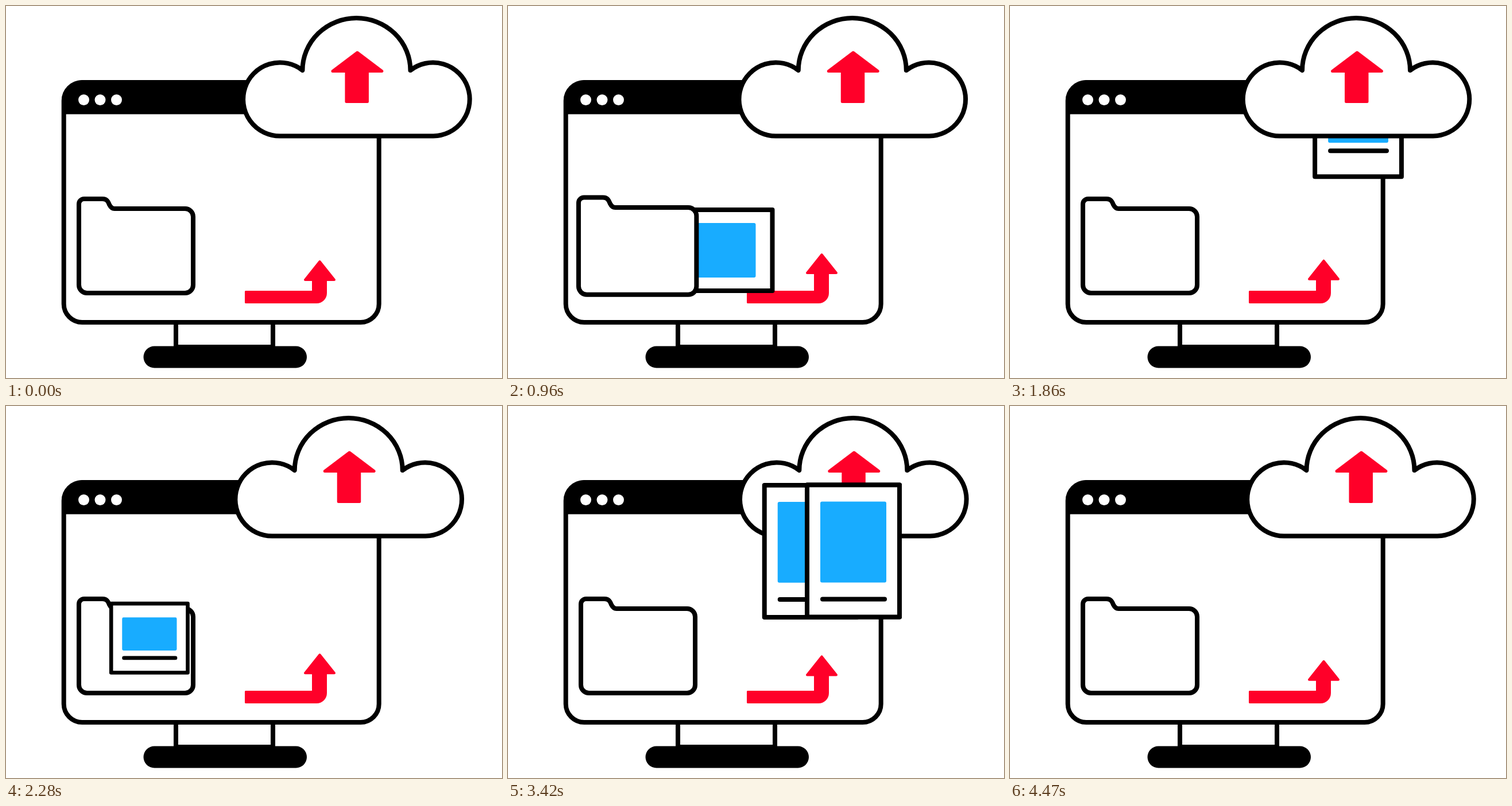
Recreate the animation shown at these times as an HTML page with a canvas. Size 864 by 648 pixels, loop 4.5 s.

```html
<!DOCTYPE html>
<html lang="en">
<head>
<meta charset="utf-8">
<title>Cloud upload</title>
<style>
  html, body { margin: 0; width: 100%; height: 100%; overflow: hidden; background: #fff; }
  canvas { display: block; width: 864px; height: 648px; }
</style>
</head>
<body>
<canvas id="stage" width="864" height="648"></canvas>
<script>
const ctx = document.getElementById('stage').getContext('2d');
const LOOP = 4500, LINE = 8;
const BLACK = '#000', WHITE = '#fff', RED = '#ff0029', BLUE = '#18acff';

const CLOUD = new Path2D('M477.5 226.5A64 64 0 1 1 516.5 112A94 91 0 0 1 704.5 112' +
  'A64 64 0 1 1 744.5 226.5Z');
const UP_ARROW = new Path2D('M612 81L655 113.5H629.5V166.5H593V113.5H569Z');
const FOLDER = new Path2D('M136 336H168C176 336 178 341 180 346C182 350 184 353 189 353' +
  'H312A14 14 0 0 1 326 367V486A14 14 0 0 1 312 500H141A14 14 0 0 1 127 486V345A9 9 0 0 1 136 336Z');

// Durations of sideways travel, climb and stretch; later sheets land underneath
const FLIGHTS = [
  { start: 3130, travel: 403, climb: 300, grow: 290 },
  { start: 2420, travel: 357, climb: 405, grow: 1000 },
  { start: 2200, travel: 400, climb: 440, grow: 690 }
];

const mix = (a, b, p) => a + (b - a) * p;
const ramp = (t, from, to) => Math.min(1, Math.max(0, (t - from) / (to - from)));
const wave = phase => (1 - Math.cos(2 * Math.PI * phase)) / 2;
function ease(t, from, to) {
  const u = ramp(t, from, to);
  return u * u * (3 - 2 * u);
}

function paint(path, fill, stroke, width = LINE) {
  ctx.fillStyle = fill;
  ctx.fill(path);
  if (!stroke) return;
  ctx.strokeStyle = stroke;
  ctx.lineWidth = width;
  ctx.stroke(path);
}

function box(x, y, w, h, r = 0) {
  const path = new Path2D();
  path.roundRect(x, y, w, h, r);
  return path;
}

function segment(x1, y1, x2, y2, cap) {
  ctx.strokeStyle = BLACK;
  ctx.lineWidth = LINE;
  ctx.lineCap = cap;
  ctx.beginPath();
  ctx.moveTo(x1, y1);
  ctx.lineTo(x2, y2);
  ctx.stroke();
}

function monitor() {
  paint(box(100.7, 133, 549, 418, 32), WHITE, BLACK);
  ctx.save();
  ctx.clip(box(97, 129.2, 556.5, 425.5, 36));
  paint(box(97, 129, 557, 59.5), BLACK);
  ctx.restore();
  for (const x of [135.5, 164, 192.5]) paint(box(x - 9.5, 154, 19, 19, 9.5), WHITE);
  for (const x of [296, 465]) segment(x, 551, x, 600, 'butt');
  paint(box(296, 590, 169, 10), BLACK);
  paint(box(239.5, 592.5, 284.5, 38, 19), BLACK);
}

function cornerArrow(t) {
  const base = 477 - 12 * wave(t * 7 / LOOP);
  paint(new Path2D(`M417 496H533V${base}H559V500A18 18 0 0 1 541 518H417L416 517V497Z`), RED);
  paint(new Path2D(`M546.5 ${base - 32}L572 ${base}H521Z`), RED, RED, 4);
}

function folder(t) {
  const scale = 1 - .186 * ease(t, 200, 540) + .251 * ease(t, 540, 790) - .065 * ease(t, 790, 1130);
  const path = new Path2D();
  path.addPath(FOLDER, new DOMMatrix([scale, 0, 0, scale, 253 * (1 - scale), 413 * (1 - scale)]));
  paint(path, WHITE, BLACK);
}

// skew slides the text line sideways while the sheet lies on its side
function sheet({ x, y, w, h, angle = 0, skew = 0, foot = 35, scale = 1 }) {
  ctx.save();
  ctx.translate(x, y);
  ctx.rotate(angle);
  ctx.scale(scale, scale);
  const left = -w / 2, top = -h / 2, lineY = h / 2 - foot;
  const gap = h * .16 - 9 + 4 * skew;
  paint(box(left + 4, top + 4, w - 8, h - 8), WHITE, BLACK);
  paint(box(left + 27, top + 33, w - 54, Math.max(0, lineY - gap - top - 33), 3), BLUE);
  segment(left + 31 + 27 * skew, lineY, -left - 30 + 6 * skew, lineY, 'round');
  ctx.restore();
}

// Slides out of the folder on its side, stands up, then slips behind the cloud
function slidingSheet(t) {
  if (t < 700 || t > 2000) return;
  const slide = ease(t, 700, 1320), stand = ease(t, 1320, 1560), rise = ease(t, 1660, 2000);
  sheet({
    x: mix(226, 602.5, slide) + 1.5 * stand + 4 * rise,
    y: 425.5 - 4.5 * stand - 301 * rise,
    w: mix(149, 169, stand) - 16 * rise,
    h: mix(189, 238, stand) - 150 * rise,
    angle: (1 - stand) * Math.PI / 2,
    skew: 1 - stand,
    foot: mix(28, 35, stand) + 22 * rise
  });
}

// Flies from the folder onto the cloud, then shrinks into it
function flyingSheet({ start, travel, climb, grow }, t) {
  const leave = ease(t, 3700, 4050);
  if (t <= start || leave === 1) return;
  const h = mix(150, 238, ease(t, start, start + grow));
  sheet({
    x: mix(208, 601.5, ease(t, start, start + travel)),
    y: mix(396, 252.5, ease(t, start, start + climb)) + (238 - h) / 4 - 100 * leave,
    w: 169,
    h,
    scale: ease(t, start, start + 110) * (1 - leave)
  });
}

function cloud(t) {
  ctx.save();
  ctx.translate(-14 * wave((t + 30) * 3 / LOOP), 0);
  paint(CLOUD, WHITE, BLACK);
  ctx.translate(0, 2 * wave(ramp(t, 2550, 2790)));
  paint(UP_ARROW, RED, RED, 5);
  ctx.restore();
}

function draw(t) {
  ctx.fillStyle = WHITE;
  ctx.fillRect(0, 0, 864, 648);
  ctx.lineJoin = 'round';
  monitor();
  cornerArrow(t);
  slidingSheet(t);
  folder(t);
  cloud(t);
  for (const flight of FLIGHTS) flyingSheet(flight, t);
}

const begin = performance.now();
function tick() {
  draw((performance.now() - begin) % LOOP);
  requestAnimationFrame(tick);
}
tick();
</script>
</body>
</html>
```
